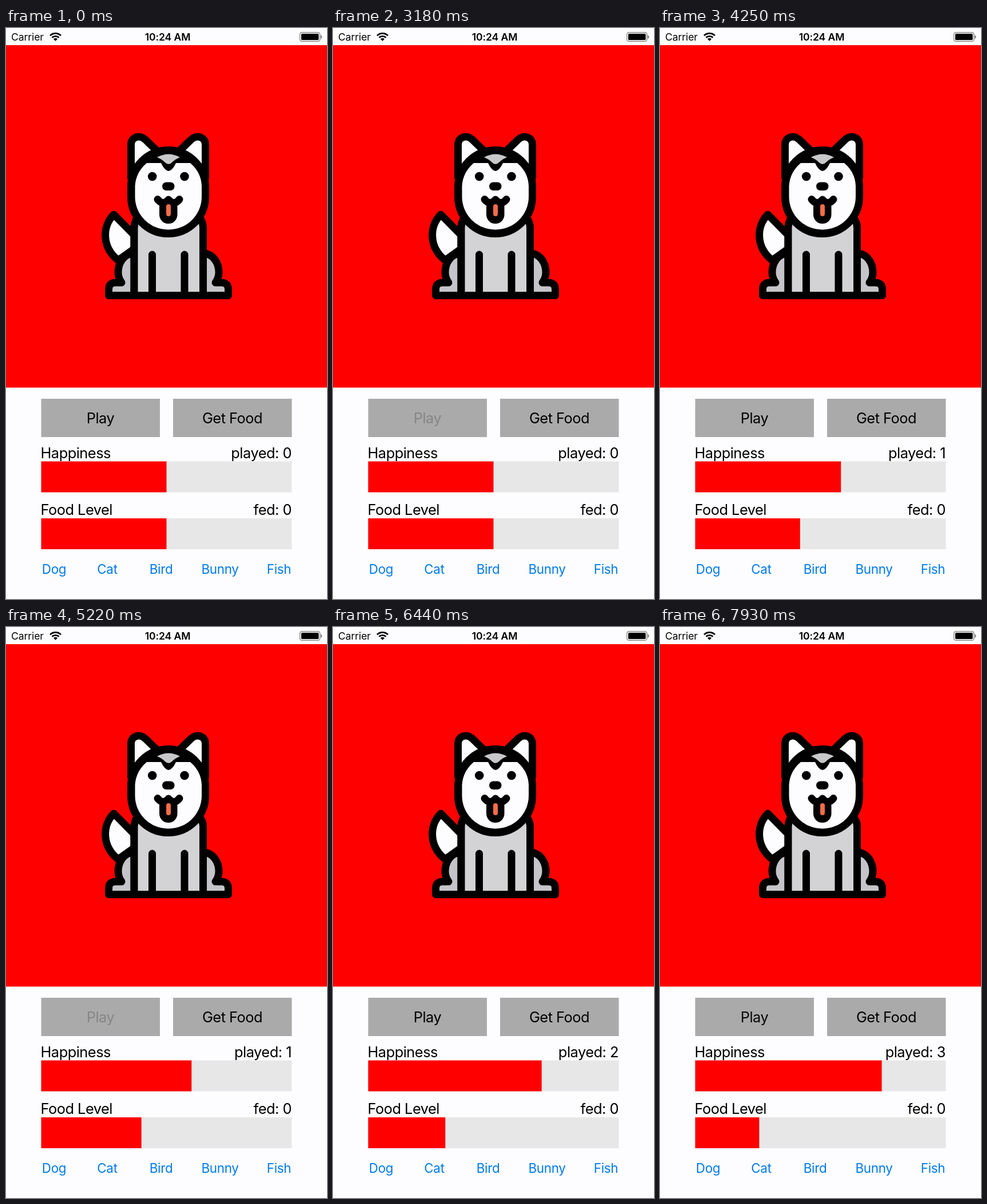
Recreate the animation shown at these times as an HTML page. Size 561 by 998 pixels, loop 8000 ms.

```html
<!DOCTYPE html>
<html lang="en">
<head>
<meta charset="utf-8">
<title>Virtual pet</title>
<style>
  html, body { margin: 0; width: 100%; height: 100%; overflow: hidden; background: #fdfdff; }
  svg { display: block; width: 100%; height: 100%; }
  text { font-family: Inter, Roboto, sans-serif; font-size: 25.4px; letter-spacing: -.5px; }
  .mid { text-anchor: middle; }
  .end { text-anchor: end; }
  .status text { font-size: 17.6px; letter-spacing: -.1px; }
  .tabs text { font-size: 22.4px; letter-spacing: -.3px; fill: #007aeb; text-anchor: middle; }
  .line { stroke: #000; stroke-width: 13; stroke-linecap: round; stroke-linejoin: round; }
</style>
</head>
<body>
<svg viewBox="0 0 561 998">
  <defs>
    <g id="hind">
      <path class="line" fill="#c4c4c9" d="M224 394C205 394 196 412 196 427C196 436 199 441 202 445H192Q179.500 445 179.500 457V467.500H224Z"/>
    </g>
    <path id="ear" class="line" fill="#fdfdff" d="M218.500 262V204C218.500 190 234 186 243.500 195L263 214"/>
  </defs>

  <g class="status">
    <text x="9" y="21.500">Carrier</text>
    <text class="mid" x="282.500" y="21.500" font-weight="600">10:24 AM</text>
    <g fill="none" stroke="#000" stroke-width="2.800">
      <path d="M77 13.200A13.500 13.500 0 0 1 96 13.200"/>
      <path d="M80.500 16.800A8.600 8.600 0 0 1 92.500 16.800"/>
    </g>
    <path d="M83 19.200A5 5 0 0 1 90 19.200L86.500 22.700Z"/>
    <rect x="513.700" y="7.700" width="35" height="15.600" rx="3.500" fill="none" stroke="#888" stroke-width="1.400"/>
    <rect x="516" y="10" width="30.500" height="11" rx="1.500"/>
    <path d="M550 12.500Q552.500 13 552.500 15.500T550 18.500Z" fill="#888"/>
  </g>

  <rect y="30" width="561" height="598.500" fill="#f00"/>
  <g id="dog">
    <path class="line" fill="#fdfdff" d="M188.500 326C168 346 167 383 196 406L224 386V362Z"/>
    <use href="#hind"/>
    <use href="#hind" transform="matrix(-1 0 0 1 568 0)"/>
    <path class="line" fill="#d3d3d5" d="M224 467.500V349Q224 341 228 334H340Q344.500 341 344.500 349V467.500Z"/>
    <path class="line" d="M255.500 396V467M312 396V467"/>
    <use href="#ear"/>
    <use href="#ear" transform="matrix(-1 0 0 1 567 0)"/>
    <path class="line" d="M218.500 278A65 64.500 0 0 1 348.500 278V295A65 64.500 0 0 1 218.500 295Z"/>
    <path fill="#fdfdff" d="M225.500 276Q227 252 246 236H271Q277 249 284 250Q291 249 297 236H322Q341 252 342 276V295A58.250 57.500 0 0 1 225.500 295Z"/>
    <path fill="#c8c8cb" d="M264 226Q284 215 304 226Q296 229 290 235Q284 241 278 235Q272 229 264 226Z"/>
    <circle cx="255.700" cy="259.500" r="7.800"/>
    <circle cx="312" cy="259.500" r="7.800"/>
    <rect x="273" y="269.500" width="21.500" height="14.500" rx="7.200"/>
    <path class="line" fill="none" d="M265 299.500Q274 311 284 300Q294 311 303 299.500"/>
    <rect x="268" y="297" width="31.500" height="45" rx="15.700"/>
    <rect x="280" y="308" width="8" height="21" rx="4" fill="#f46d48"/>
  </g>

  <path fill="#aaa" d="M61.500 648h207.500v67h-207.500zM292 648h207.500v67h-207.500z"/>
  <text id="play" class="mid" x="165" y="691">Play</text>
  <text class="mid" x="395.500" y="691">Get Food</text>

  <text x="60.500" y="751.500">Happiness</text>
  <text id="played" class="end" x="499" y="751.500"></text>
  <text x="60.500" y="851">Food Level</text>
  <text class="end" x="499" y="851">fed: 0</text>
  <path fill="#e7e7e7" d="M61.500 757.500h438v54h-438zM61.500 857h438v54h-438z"/>
  <rect id="happy" x="61.500" y="757.500" height="54" fill="#f00"/>
  <rect id="food" x="61.500" y="857" height="54" fill="#f00"/>

  <g class="tabs">
    <text x="84" y="954">Dog</text>
    <text x="177" y="954">Cat</text>
    <text x="271" y="954">Bird</text>
    <text x="374" y="954">Bunny</text>
    <text x="477" y="954">Fish</text>
  </g>
</svg>
<script>
const LOOP = 8000, BAR = 438, FILL_MS = 1430, FADE_MS = 800;
const taps = [{ down: 3180, up: 3247 }, { down: 5220, up: 5291 }, { down: 7220, up: 7262 }];
const $ = id => document.getElementById(id);
const clamp = v => Math.min(1, Math.max(0, v));

// cubic-bezier(.42, 0, .58, 1)
function ease(x) {
  x = clamp(x);
  let lo = 0, hi = 1;
  for (let i = 0; i < 20; i++) {
    const s = (lo + hi) / 2, r = 1 - s;
    if (1.26 * r * r * s + 1.74 * r * s * s + s * s * s < x) lo = s; else hi = s;
  }
  return lo * lo * (3 - 2 * lo);
}

function draw(now) {
  const t = now % LOOP;
  let shift = 0, count = 0, grey = 0;
  for (const { down, up } of taps) {
    if (t < down) break;
    shift += 0.1 * ease((t - up) / FILL_MS);
    count += t >= up;
    grey = 134 * (1 - ease((t - up) / FADE_MS));
  }
  $("happy").setAttribute("width", BAR * (0.5 + shift));
  $("food").setAttribute("width", BAR * (0.5 - shift));
  $("played").textContent = "played: " + count;
  $("play").setAttribute("fill", `rgb(${grey},${grey},${grey})`);
  requestAnimationFrame(draw);
}
draw(performance.now());
</script>
</body>
</html>
```
